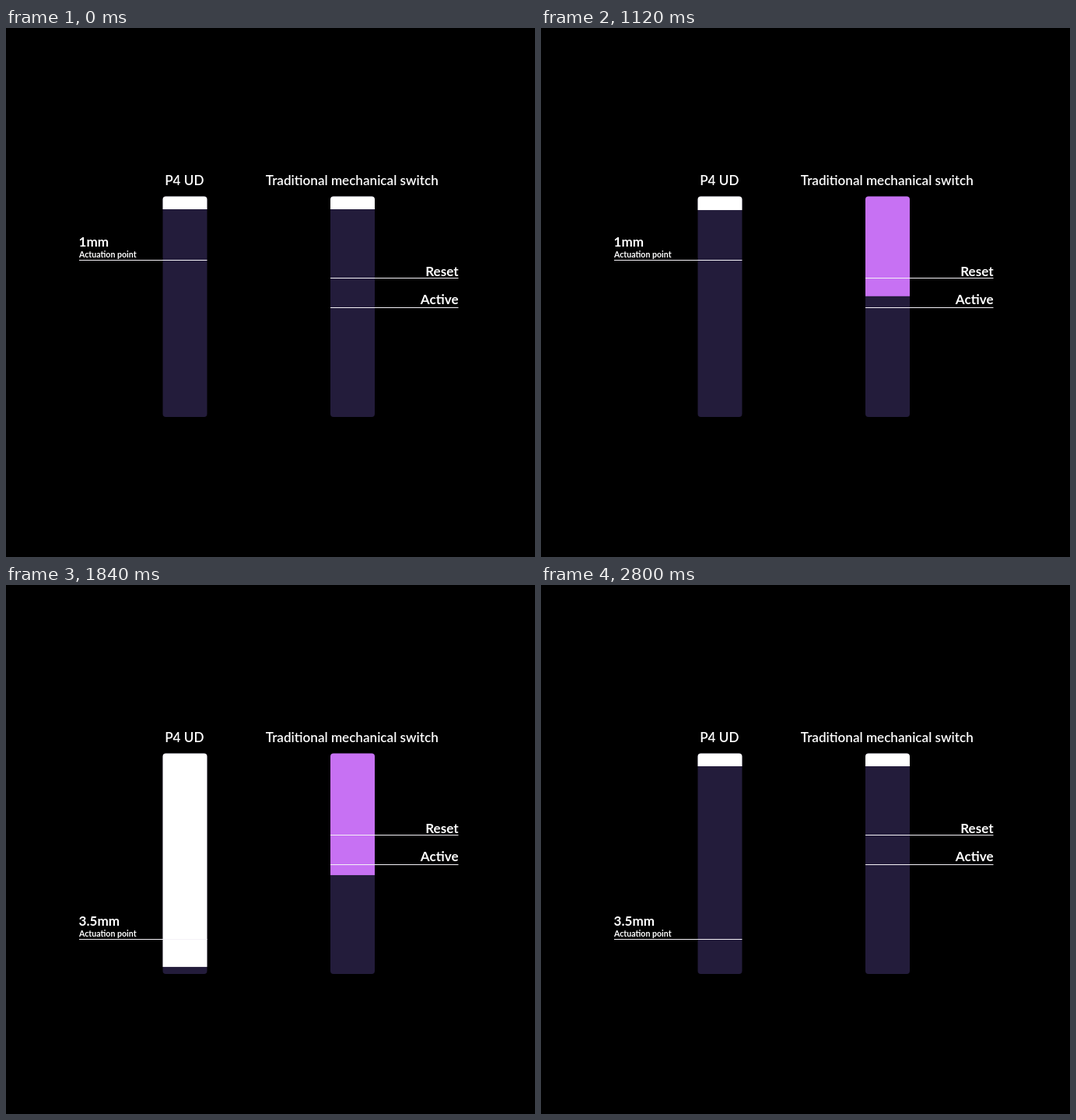
An HTML page that plays this animation: 680 by 680 pixels, repeating every 3.24 s.

```html
<!DOCTYPE html>
<html lang="en">
<head>
<meta charset="utf-8">
<title>Switch travel comparison</title>
<style>
  html, body { margin: 0; width: 100%; height: 100%; overflow: hidden; background: #000; }
  svg { display: block; width: 100vw; height: 100vh; }
  text { font: 700 17.1px Lato, sans-serif; fill: #fff; }
  .title { font-weight: 600; text-anchor: middle; }
  .small { font-size: 10.6px; }
  .end { text-anchor: end; }
  .track { fill: #231c3b; }
  line { stroke: #f4f2f7; stroke-width: 1; }
</style>
</head>
<body>
<svg viewBox="0 0 680 680">
  <defs>
    <clipPath id="bars">
      <rect x="201.5" y="216.5" width="57" height="283.5" rx="4"/>
      <rect x="417" y="216.5" width="57" height="283.5" rx="4"/>
    </clipPath>
  </defs>

  <text class="title" x="229.3" y="202.3">P4 UD</text>
  <text class="title" x="444.8" y="202.3">Traditional mechanical switch</text>

  <g clip-path="url(#bars)">
    <rect class="track" x="201" y="216" width="274" height="285"/>
    <rect id="left" x="201" y="216" width="58"/>
    <rect id="right" x="416" y="216" width="59"/>
  </g>

  <g id="point">
    <text id="depth" x="93.6" y="280.8">1mm</text>
    <text class="small" x="94" y="295">Actuation point</text>
    <line x1="94" y1="298.5" x2="258.5" y2="298.5"/>
  </g>

  <text class="end" x="581.6" y="319">Reset</text>
  <line x1="417" y1="321.5" x2="581.5" y2="321.5"/>
  <text class="end" x="581.6" y="355">Active</text>
  <line x1="417" y1="359.5" x2="581.5" y2="359.5"/>
</svg>
<script>
  const LOOP = 3240, STEP = 40;
  const TOP = 216, REST = 233, BOTTOM = 500;
  const RESET = 321.5, ACTIVE = 359.5;
  const ON = '#c771f3', OFF = '#fff';
  const SECOND = 1160; // the actuation point moves here

  // Each press: start, reach bottom, release, back at rest (ms)
  const presses = {
    left: [[45, 588, 614, 1122], [1161, 1736, 1820, 2408]],
    right: [[116, 693, 777, 1367], [1536, 2116, 2204, 2798]]
  };

  const $ = id => document.getElementById(id);
  const ramp = (t, a, b) => Math.min(1, Math.max(0, (t - a) / (b - a)));

  function pose(list, t) {
    const [start, low, release, end] = list.find(p => t < p[3]) || list[1];
    const depth = ramp(t, start, low) - ramp(t, release, end);
    return { y: REST + (BOTTOM - REST) * depth, rising: t >= release };
  }

  function fill(id, y, active) {
    const bar = $(id);
    bar.setAttribute('height', y - TOP);
    bar.setAttribute('fill', active ? ON : OFF);
  }

  function draw(ms) {
    const t = Math.floor((ms % LOOP) / STEP) * STEP;
    const deep = t >= SECOND;
    const l = pose(presses.left, t);
    const r = pose(presses.right, t);

    fill('left', l.y, !l.rising && l.y > (deep ? 455.5 : 298.5));
    fill('right', r.y, r.y > (r.rising ? RESET : ACTIVE));

    $('depth').textContent = deep ? '3.5mm' : '1mm';
    $('point').setAttribute('transform', `translate(0 ${deep ? 157 : 0})`);
  }

  const origin = performance.now();
  function tick() {
    draw(performance.now() - origin);
    requestAnimationFrame(tick);
  }
  tick();
</script>
</body>
</html>
```
